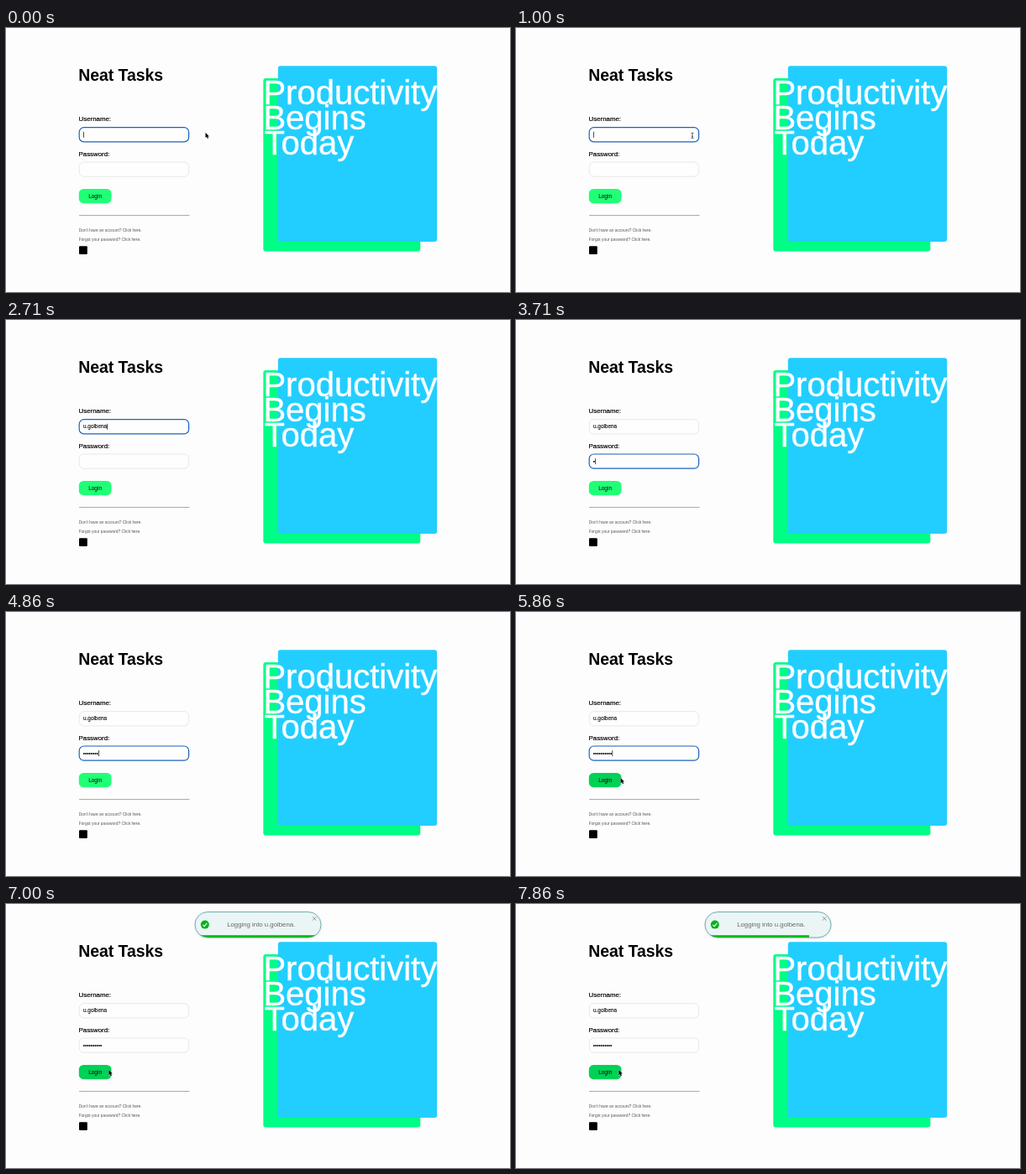
Write an HTML page that moves like this. It is 600x315 px and loops after 8000 ms.

```html
<!DOCTYPE html>
<html lang="en">
<head>
<meta charset="utf-8">
<title>Login</title>
<style>
html, body { margin: 0; width: 100%; height: 100%; overflow: hidden; background: #fdfdfd; }
svg { display: block; width: 600px; height: 315px; font-family: "Liberation Sans", Helvetica, Arial, sans-serif; }
.label { font-size: 7.85px; stroke: #000; stroke-width: .2; }
.value { font-size: 6.4px; stroke: #000; stroke-width: .1; }
.small { font-size: 4.85px; fill: #555; }
.slogan { font-size: 40px; fill: #fff; stroke: #fff; stroke-width: .4; }
.field { fill: #fefefe; stroke: #e2e2e2; stroke-width: .8; }
.field.focus { stroke: #1c63ba; stroke-width: 1.2; }
</style>
</head>
<body>
<svg viewBox="0 0 600 315">
  <defs>
    <clipPath id="pill"><rect x="225" y="9.5" width="150" height="30.5" rx="15.2"/></clipPath>
    <filter id="shadow" x="-10%" y="-30%" width="120%" height="170%">
      <feDropShadow dx="0" dy=".6" stdDeviation="1.8" flood-opacity=".14"/>
    </filter>
  </defs>

  <text x="86.2" y="63" font-size="19.4" font-weight="700">Neat Tasks</text>
  <text class="label" x="86.6" y="111.3">Username:</text>
  <rect id="userBox" class="field" x="87.2" y="118.7" width="130.4" height="17.2" rx="5.5"/>
  <text id="user" class="value" x="92" y="129.4"></text>
  <text class="label" x="86.6" y="152.8">Password:</text>
  <rect id="passBox" class="field" x="87.2" y="160" width="130.4" height="17.2" rx="5.5"/>
  <text id="pass" class="value" x="91.8" y="170.7"></text>
  <rect id="caret" width=".7" height="7"/>

  <rect id="button" x="86.8" y="192" width="38.7" height="17.2" rx="5.5"/>
  <text x="106.1" y="202.7" font-size="6.5" text-anchor="middle">Login</text>
  <path d="M87 223.5H218.5" stroke="#aaa"/>
  <text class="small" x="86.7" y="243">Don't have an account? Click here.</text>
  <text class="small" x="86.7" y="253.6">Forgot your password? Click here.</text>
  <rect x="87" y="260.3" width="9.8" height="9.8" rx="1"/>

  <rect x="306.3" y="60" width="187" height="206.4" rx="3" fill="#00fd85"/>
  <rect x="323.8" y="45.3" width="189.3" height="209.7" rx="3" fill="#22ceff"/>
  <text class="slogan" x="306.4" y="90.8">Productivity</text>
  <text class="slogan" x="306.4" y="120.8">Begins</text>
  <text class="slogan" x="307.6" y="150.8">Today</text>

  <g id="toast">
    <rect x="225" y="9.5" width="150" height="30.5" rx="15.2" fill="#ebf5f6" filter="url(#shadow)"/>
    <rect id="bar" x="225" y="37.2" height="2.8" fill="#07bc0c" clip-path="url(#pill)"/>
    <rect x="225" y="9.5" width="150" height="30.5" rx="15.2" fill="none" stroke="#4f9c98" stroke-width=".8"/>
    <circle cx="236.8" cy="24.6" r="5" fill="#07b01c"/>
    <path d="M234.4 24.8l1.7 1.8 3.2-3.7" fill="none" stroke="#fff" stroke-width="1.1"/>
    <text x="263.2" y="27.3" font-size="7.8" fill="#666">Logging into u.golbena.</text>
    <path d="M365 15.2l4.4 4.4m0-4.4l-4.4 4.4" stroke="#8b9494" stroke-width="1"/>
  </g>

  <path id="arrow" d="M0 0V6.3L1.4 5 2.4 7.3 3.5 6.8 2.5 4.6H4.4Z" stroke="#fff" stroke-width=".6" paint-order="stroke"/>
  <path id="beam" d="M-1.5-3.2Q0-3.2 0-2.2Q0-3.2 1.5-3.2M0-2.4V2.4M-1.5 3.2Q0 3.2 0 2.2Q0 3.2 1.5 3.2M-.7 1H.7" fill="none" stroke="#222" stroke-width=".7"/>
</svg>
<script>
const LOOP = 8000, STEP = 1000 / 7, NAME = "u.golbena";
const TOAST_START = 6290, ENTER = 700, AUTO_CLOSE = 5000;
const $ = id => document.getElementById(id);
const clamp = (v, lo, hi) => Math.max(lo, Math.min(hi, v));
const between = (v, lo, hi) => v >= lo && v < hi;
const show = (id, on) => $(id).setAttribute("visibility", on ? "visible" : "hidden");

// Pointer places per step: into the first field, then down to the button
const toField = [[237.5, 124.8], [237.5, 124.8], [234, 125], [227, 126], [220, 127], [210, 128.3]];
const toButton = [[205, 133], [188, 150], [165, 172], [140, 190], [124.6, 198], [120, 199], [121.5, 198.3], [122.4, 198]];

function pointerAt(step) {
  if (step < 10) return toField[Math.min(step, toField.length - 1)];
  if (step >= 37) return toButton[Math.min(step - 37, toButton.length - 1)];
  return null; // hidden while typing
}

// Bounce-in from above: [progress, offset]
const bounce = [[0, -1410], [.6, 11.75], [.75, -4.7], [.9, 2.35], [1, 0]];
function toastOffset(p) {
  if (p >= 1) return 0;
  const i = bounce.findIndex(b => b[0] > p);
  const [p0, y0] = bounce[i - 1], [p1, y1] = bounce[i];
  return y0 + (y1 - y0) * (1 - (1 - (p - p0) / (p1 - p0)) ** 3);
}

function drawPointer(step) {
  const pos = pointerAt(step);
  show("arrow", false);
  show("beam", false);
  if (!pos) return;
  const [x, y] = pos;
  const overField = between(x, 87, 218) && (between(y, 119, 136) || between(y, 160, 177));
  const id = overField ? "beam" : "arrow";
  $(id).setAttribute("transform", `translate(${x} ${y})`);
  show(id, true);
}

function drawForm(step) {
  const typed = clamp(step < 15 ? step - 9 : step - 10, 0, NAME.length);
  const dots = step < 26 ? 0 : step < 28 ? 1 : Math.min(step - 26 + (step >= 35), 10);
  const inUser = step < 21, inPass = between(step, 21, 44);
  $("user").textContent = NAME.slice(0, typed);
  $("pass").textContent = "•".repeat(dots);
  $("userBox").classList.toggle("focus", inUser);
  $("passBox").classList.toggle("focus", inPass);

  const field = $(inUser ? "user" : "pass");
  const width = field.textContent ? field.getComputedTextLength() : 0;
  const blinkOff = between(step, 3, 7) || step === 25 || between(step, 38, 41);
  $("caret").setAttribute("x", 92.1 + width);
  $("caret").setAttribute("y", inUser ? 123.8 : 165.1);
  show("caret", (inUser || inPass) && !blinkOff);
  $("button").setAttribute("fill", step >= 41 ? "#00d157" : "#20ff76");
}

function drawToast(time) {
  const age = time - TOAST_START;
  show("toast", age >= 0);
  if (age < 0) return;
  $("toast").setAttribute("transform", `translate(0 ${toastOffset(age / ENTER)})`);
  $("bar").setAttribute("width", 150 * (1 - clamp((age - ENTER) / AUTO_CLOSE, 0, 1)));
}

const start = performance.now();
function draw() {
  const time = (performance.now() - start) % LOOP;
  const step = Math.min(Math.floor((time + 5) / STEP), 55);
  drawForm(step);
  drawToast(step * STEP);
  drawPointer(step);
  requestAnimationFrame(draw);
}
draw();
</script>
</body>
</html>
```
